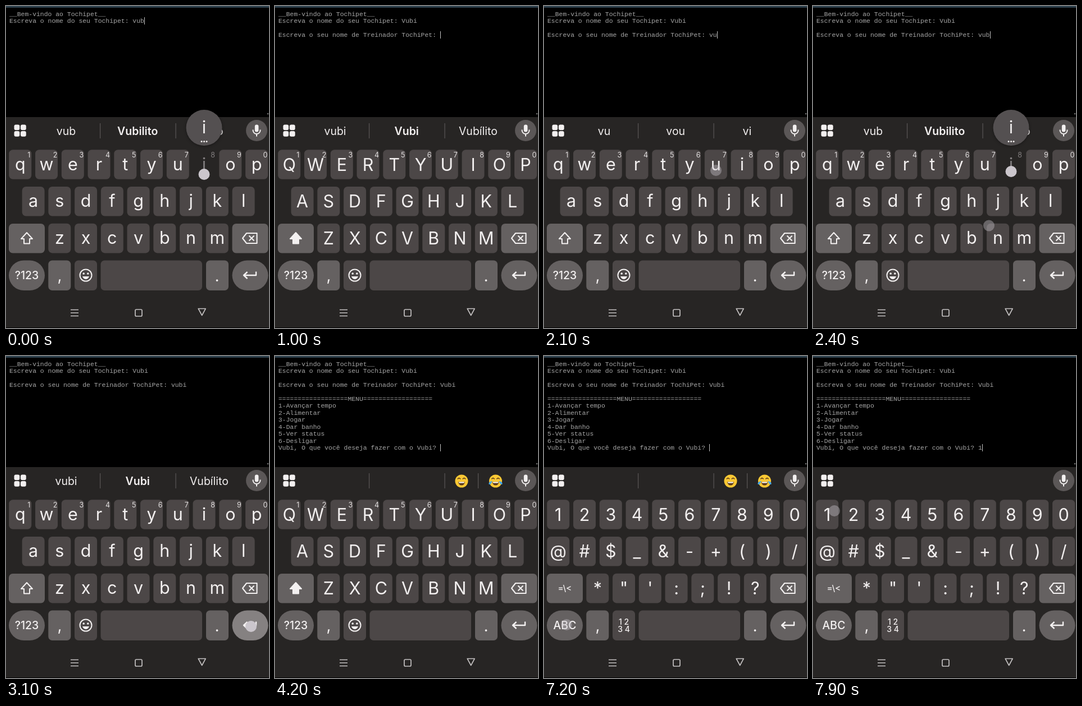
An HTML page with a canvas for the animation above (8 s loop, 468 by 574 pixels).

```html
<!DOCTYPE html>
<html lang="pt">
<head>
<meta charset="utf-8">
<title>Tochipet</title>
<style>
html, body { margin: 0; width: 468px; height: 574px; overflow: hidden; background: #000; }
canvas { display: block; }
</style>
</head>
<body>
<canvas id="stage" width="468" height="574"></canvas>
<script>
const g = document.getElementById('stage').getContext('2d');
const SANS = 'Inter, sans-serif', MONO = '"Liberation Mono", monospace';
const BG = '#272524', KEY = '#4c4747', SPECIAL = '#656161', INK = '#f3f0f0', DIM = '#827e7f';
const PITCH = 46.75, CHAR = 6.857;

const WELCOME = '__Bem-vindo ao Tochipet__';
const ASK_PET = 'Escreva o nome do seu Tochipet: ';
const ASK_TRAINER = 'Escreva o seu nome de Treinador TochiPet: ';
const RULE = '='.repeat(18);
const MENU = [RULE + 'MENU' + RULE, '1-Avançar tempo', '2-Alimentar', '3-Jogar',
  '4-Dar banho', '5-Ver status', '6-Desligar'];
const ASK_ACTION = 'Vubi, O que você deseja fazer com o Vubi? ';

// Each timeline entry holds from its start time until the next one.
const typed = [[0, 'vub'], [100, 'vubi'], [900, ''], [1900, 'v'], [2100, 'vu'],
  [2300, 'vub'], [2500, 'vubi'], [3200, ''], [7800, '1']];
const partial = ['vub', '*Vubilito', 'vinho'], full = ['vubi', '*Vubi', 'Vubílito'];
const suggestions = [[0, partial], [100, full], [1100, ['não', 'e', 'o']], [1900, ['v', 'vou', 'você']],
  [2100, ['vu', 'vou', 'vi']], [2300, partial], [2500, full], [3500, 'emoji'], [7800, null]];
const layouts = [[0, 'lower'], [900, 'upper'], [1100, 'lower'], [3300, 'upper'], [7100, 'symbols']];
// key, press, release, touch x, touch y
const taps = [['i', 0, 100, 352.5, 300], ['enter', 600, 800, 436, 482], ['v', 1800, 1900, 262.5, 393],
  ['u', 2000, 2100, 306, 293], ['b', 2200, 2400, 313, 391.5], ['i', 2400, 2600, 352.5, 295],
  ['enter', 3000, 3200, 436, 482], ['mode', 7000, 7200, 40, 479], ['1', 7700, 7900, 38, 276]];

const current = (list, t) => list.findLast(e => e[0] <= t);

function box(x, y, w, h, r, fill) {
  g.fillStyle = fill;
  g.beginPath();
  g.roundRect(x, y, w, h, r);
  g.fill();
}

function disc(x, y, r, fill) {
  g.fillStyle = fill;
  g.beginPath();
  g.arc(x, y, r, 0, 7);
  g.fill();
}

function text(s, x, y, size, fill = INK, weight = 400) {
  g.font = `${weight} ${size}px ${SANS}`;
  g.textAlign = 'center';
  g.fillStyle = fill;
  g.fillText(s, x, y);
}

// Draws path data around (x, y): filled, or stroked when a width is given.
function icon(d, x, y, color = INK, width = 0) {
  const p = new Path2D(d);
  g.save();
  g.translate(x, y);
  g.fillStyle = g.strokeStyle = color;
  g.lineWidth = width;
  g.lineJoin = 'round';
  width ? g.stroke(p) : g.fill(p);
  g.restore();
}

function terminal(t) {
  const [since, input] = current(typed, t);
  const lines = [WELCOME];
  if (t < 900) lines.push(ASK_PET + input);
  else {
    lines.push(ASK_PET + 'Vubi', '');
    if (t < 3200) lines.push(ASK_TRAINER + input);
    else lines.push(ASK_TRAINER + 'Vubi', '', ...MENU, ASK_ACTION + input);
  }
  g.font = '11.43px ' + MONO;
  g.textAlign = 'left';
  g.fillStyle = '#a6a6a6';
  lines.forEach((s, i) => g.fillText(s, 6, 17.7 + 12.45 * i));
  const last = lines.length - 1;
  if (Math.floor((t - since) / 500) % 2 === 0) {
    g.fillStyle = '#c4c4c4';
    g.fillRect(Math.round(6 + CHAR * lines[last].length), Math.round(7.5 + 12.45 * last), 1, 13);
  }
}

function face(x, tears) {
  disc(x, 223, 11.5, '#fbc834');
  icon('M-7-2q2.5-4 5 0M2-2q2.5-4 5 0', x, 221.5, '#5b3a1c', 1.5);
  icon('M-6 2h12q-1 6-6 6t-6-6', x, 222.5, '#5b3a1c');
  box(x - 5, 224.5, 10, 2, 1, '#fff');
  if (tears) icon('M-6-1q-7 2-6 6q4 2 6-6M6-1q7 2 6 6q-4 2-6-6', x, 223.5, '#46a9e8');
}

function suggestionBar(t) {
  for (const [x, y] of [[14.5, 211.5], [26, 211.5], [14.5, 223], [26, 223]]) box(x, y, 9.8, 9.8, 3, INK);
  disc(446, 222, 19, '#5b5757');
  box(442.8, 211.5, 6.6, 13, 3.3, INK);
  icon('M-6.5-1v1a6.5 6.5 0 0 0 13 0v-1M0 6.5v4.5', 446, 221.5, INK, 2);

  const words = current(suggestions, t)[1];
  if (!words) return;
  const emoji = words === 'emoji';
  g.fillStyle = '#5a5656';
  for (const x of emoji ? [167, 301.5, 361] : [167, 301.5]) g.fillRect(x, 209, 1.2, 27);
  if (emoji) {
    face(332, false);
    face(392.5, true);
  } else words.forEach((w, i) => {
    const bold = w[0] === '*';
    text(bold ? w.slice(1) : w, 107 + 127.2 * i, 229.5, 19.5, INK, bold ? 600 : 400);
  });
}

function keyRows(mode) {
  const symbols = mode === 'symbols';
  const rows = symbols ? ['1234567890', '@#$_&-+()/', '*"\':;!?'] : ['qwertyuiop', 'asdfghjkl', 'zxcvbnm'];
  const left = [25.3, symbols ? 25.3 : 48.6, 95.3];
  return rows.flatMap((row, r) => [...row].map((name, i) => ({
    name, label: mode === 'upper' ? name.toUpperCase() : name,
    hint: r === 0 && !symbols ? (i + 1) % 10 : '',
    x: left[r] + PITCH * i, y: 282.5 + 65.8 * r
  })));
}

function keyboard(mode, held) {
  const isHeld = name => held.some(k => k[0] === name);
  const base = mode === 'lower' ? 10 : 11;
  const symbols = mode === 'symbols';
  const keys = keyRows(mode);
  for (const k of keys) {
    const down = isHeld(k.name);
    if (!down) box(k.x - 20, k.y - 26.3, 40, 52.6, 7, KEY);
    text(k.label, k.x, k.y + base, 30.5, down ? DIM : INK);
    text(k.hint, k.x + 15.5, k.y - 12.3, 12.5, down ? DIM : '#e4e1e1');
  }

  box(5, 388, 64, 52.6, 7, SPECIAL);
  if (symbols) text('=\\<', 37, 419, 15, INK, 500);
  else {
    const arrow = 'M0-10L10 1H5V9.5H-5V1H-10Z';
    if (mode === 'upper') icon(arrow, 37, 414);
    icon(arrow, 37, 414, INK, 2);
  }
  box(402.5, 388, 64, 52.6, 7, SPECIAL);
  icon('M-13 0L-6-9H12.5V9H-6ZM-1.5-4.5l9 9m0-9l-9 9', 434, 414, INK, 2.1);

  box(5, 453.5, 64, 53.5, 27, isHeld('mode') ? '#858181' : SPECIAL);
  text(symbols ? 'ABC' : '?123', 37, 487, 19.5, INK, 500);
  box(75.3, 453.5, 40, 53.5, 7, SPECIAL);
  text(',', 95.5, 490, 28);
  box(122, 453.5, 40, 53.5, 7, KEY);
  if (symbols) {
    text('1 2', 142, 479, 14, INK, 500);
    text('3 4', 142, 492, 14, INK, 500);
  } else {
    icon('M10.5 0a10.5 10.5 0 1 1-21 0a10.5 10.5 0 1 1 21 0', 142, 480, INK, 2);
    disc(138.2, 477, 1.8, INK);
    disc(145.8, 477, 1.8, INK);
    icon('M-6 2H6Q4 7 0 7T-6 2', 142, 480);
  }
  box(168.5, 453.5, 180.5, 53.5, 7, KEY);
  box(356, 453.5, 40, 53.5, 7, SPECIAL);
  text('.', 375.5, 491, 28);
  box(402.5, 453.5, 64, 53.5, 27, isHeld('enter') ? '#858181' : SPECIAL);
  icon('M11-6.5V0H-10M-4.5-6L-11 0L-4.5 6', 434, 480, INK, 2.4);

  for (const k of keys.filter(k => isHeld(k.name))) {
    const y = k.y - 65.5;
    g.shadowColor = '#0006';
    g.shadowBlur = 5;
    g.shadowOffsetY = 1;
    disc(k.x, y, 32, '#545051');
    g.shadowColor = 'transparent';
    text(k.label, k.x, y + base, 30.5);
    if ('iu1'.includes(k.name)) for (const dx of [-4.5, 0, 4.5]) disc(k.x + dx, y + 24.5, 1.5, INK);
  }
}

function navBar() {
  const c = '#c4c1c1';
  icon('M-7-5.5H7M-7 0H7M-7 5.5H7', 122, 547, c, 1.5);
  icon('M-4-6H4Q6-6 6-4V4Q6 6 4 6H-4Q-6 6-6 4V-4Q-6-6-4-6Z', 236, 547, c, 1.7);
  icon('M-6.5-6H6.5L0 6Z', 348.7, 545.5, c, 1.6);
}

function draw() {
  const t = Math.floor(performance.now() % 8000 / 100) * 100;
  g.fillStyle = '#000';
  g.fillRect(0, 0, 468, 574);
  g.fillStyle = '#2c404c';
  g.fillRect(0, 0, 468, 3);
  terminal(t);
  g.fillStyle = '#aaa';
  g.fillRect(465, 191.5, 2, 1.5);
  g.fillStyle = BG;
  g.fillRect(0, 198, 468, 375);
  suggestionBar(t);
  keyboard(current(layouts, t)[1], taps.filter(k => t >= k[1] && t < k[2]));
  navBar();
  // Touch dots linger faintly for a moment after release.
  for (const [, from, to, x, y] of taps) {
    if (t >= from && t < to + 100) disc(x, y, 10, t < to ? '#cbc6cc' : 'rgba(203,198,204,.4)');
  }
  requestAnimationFrame(draw);
}
draw();
</script>
</body>
</html>
```
